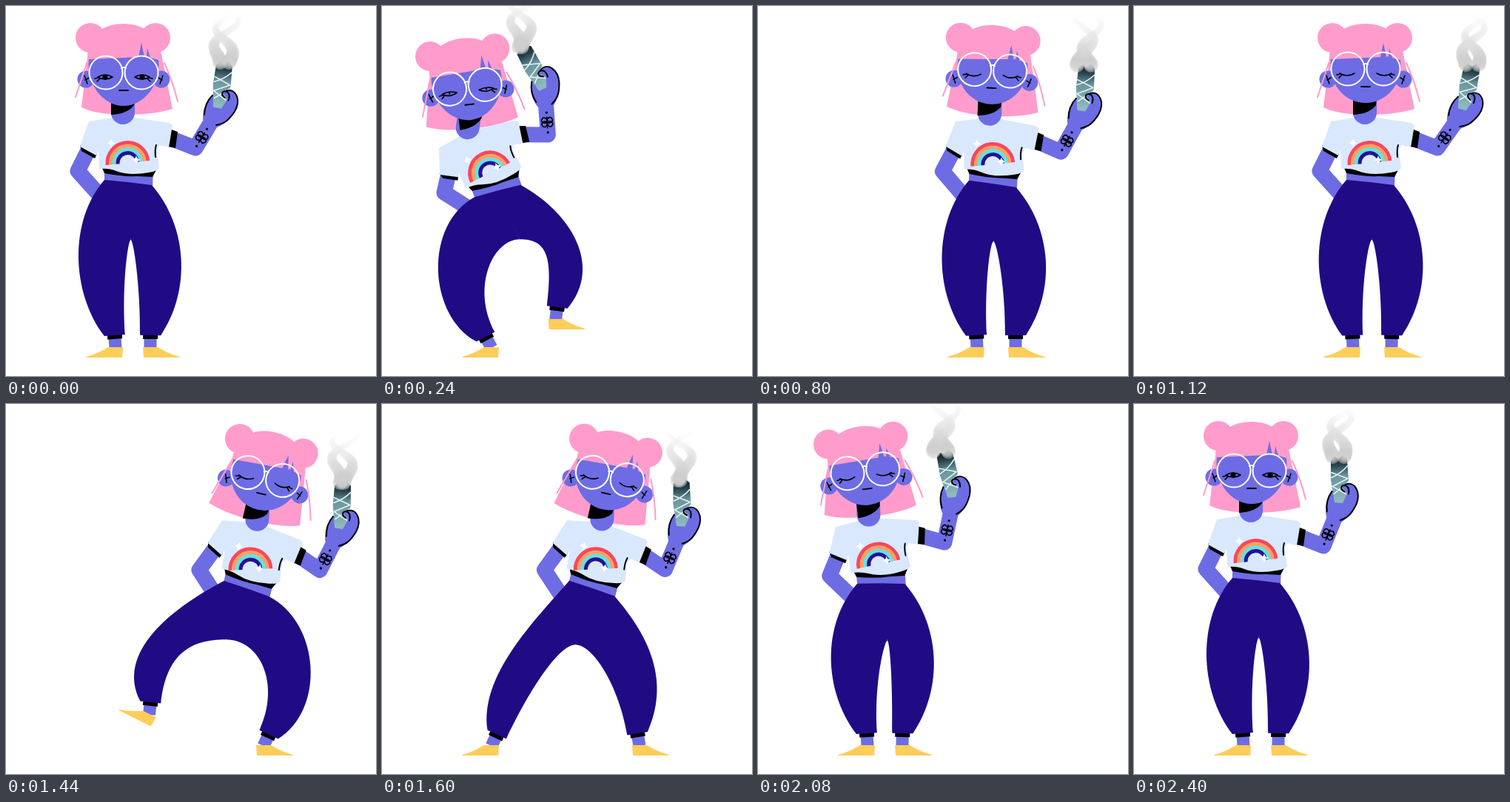
An HTML page with a canvas for the animation above (2.48 s loop, 500 by 500 pixels).

```html
<!DOCTYPE html>
<html lang="en">
<head>
<meta charset="utf-8">
<title>Dancer</title>
<style>
  html, body { margin: 0; width: 100%; height: 100%; overflow: hidden; background: #fff; }
  canvas { display: block; width: 500px; height: 500px; }
</style>
</head>
<body>
<canvas id="stage" width="500" height="500"></canvas>
<script>
const LOOP = 2480, STEP = 80, GROUND = 462;
const SKIN = '#6d6ce4', HAIR = '#ff9ccb', SHIRT = '#d9e8fd', PANTS = '#210b85', SHOE = '#ffcd58', INK = '#000';
const ctx = document.getElementById('stage').getContext('2d');

// Key poses: time, neck x, torso tilt, head tilt, forearm angle
const POSES = [
  [0, 159, 0, 0, 31],
  [240, 122, -21, -7, -4],
  [560, 228, -17, -16, 18],
  [840, 317, 3, 4, 30],
  [1120, 313, 0, 0, 35],
  [1440, 337, 13, 13, 27],
  [1680, 262, 12, 12, 20],
  [1840, 184, 5, 1, 13],
  [2080, 152, -6, -7, 12],
  [2400, 159, 0, 0, 22]
];

// Looping monotone cubic interpolation of every column
function sample(rows, t) {
  const n = rows.length;
  const at = (j, c) => rows[(j + n) % n][c] + (c ? 0 : Math.floor(j / n) * LOOP);
  const slope = (j, c) => (at(j + 1, c) - at(j, c)) / (at(j + 1, 0) - at(j, 0));
  const tangent = (j, c) => {
    const a = slope(j - 1, c), b = slope(j, c);
    return a * b > 0 ? 2 * a * b / (a + b) : 0;
  };
  let i = n - 1;
  while (rows[i][0] > t) i--;
  const span = at(i + 1, 0) - at(i, 0), u = (t - at(i, 0)) / span, v = 1 - u;
  return rows[i].slice(1).map((p, k) => {
    const c = k + 1;
    return p * v * v * (1 + 2 * u) + at(i + 1, c) * u * u * (3 - 2 * u) +
      span * u * v * (v * tangent(i, c) - u * tangent(i + 1, c));
  });
}

const progress = (t, from, to) => Math.min(1, Math.max(0, (t - from) / (to - from)));
const ease = (t, from, to) => { const u = progress(t, from, to); return u * u * (3 - 2 * u); };
const arch = (t, from, to) => Math.sin(Math.PI * progress(t, from, to));
const rad = deg => deg * Math.PI / 180;

function place(origin, deg, x, y) {
  const c = Math.cos(rad(deg)), s = Math.sin(rad(deg));
  return [origin[0] + x * c - y * s, origin[1] + x * s + y * c];
}
function group([x, y], deg, draw) {
  ctx.save();
  ctx.translate(x, y);
  ctx.rotate(rad(deg));
  draw();
  ctx.restore();
}
function fill(color, path) {
  ctx.fillStyle = color;
  ctx.fill(new Path2D(path));
}
function line(color, width, path, cap = 'round') {
  ctx.strokeStyle = color;
  ctx.lineWidth = width;
  ctx.lineCap = cap;
  ctx.lineJoin = 'round';
  ctx.stroke(new Path2D(path));
}
function disc(color, x, y, r) {
  ctx.fillStyle = color;
  ctx.beginPath();
  ctx.arc(x, y, r, 0, 7);
  ctx.fill();
}

// Each foot steps once through the air and slides back along the ground once.
function drawLegs(t, neck, tilt) {
  const liftR = arch(t, 120, 480), liftL = arch(t, 1200, 1580), crouch = liftL + liftR;
  const left = [148 + 148 * (ease(t, 460, 800) - ease(t, 1200, 1580)), GROUND - 46 * liftL];
  const right = [195 + 153 * (ease(t, 120, 480) - ease(t, 1680, 2020)), GROUND - 44 * liftR];
  const stride = right[0] - left[0];
  const crotch = place(neck, tilt, 8, 157 - 8 * crouch);
  crotch[0] += .35 * ((left[0] + right[0]) / 2 - crotch[0]);

  const halves = [[-1, left, -26, 76], [1, right, 38, 83]].map(([side, foot, x, y]) => {
    const waist = place(neck, tilt, x, y);
    const lean = Math.atan2(waist[0] - foot[0], foot[1] - waist[1]) * 180 / Math.PI;
    const hem = lean + side * 25 * crouch;
    const local = (px, py) => place(foot, hem, side * px, py);
    drawFoot(foot, hem, side < 0 ? 29 * liftL : 0, side);
    const hip = [waist[0] + side * (48 + 24 * crouch), waist[1] + 55 - 20 * crouch];
    const inside = [crotch[0] + side * (4 + 32 * crouch + .13 * (stride - 50)), crotch[1]];
    return `M${waist}C${hip} ${local(55, -79)} ${local(14, -17)}L${local(-14, -17)}` +
      `C${local(-14, -85)} ${inside} ${crotch}`;
  });
  halves.forEach(path => fill(PANTS, path + `L${place(neck, tilt, 6, 79)}Z`));
  line(PANTS, 2, `M${crotch[0]},${crotch[1] - 2}L${place(neck, tilt, 6, 81)}`, 'butt');
}

function drawFoot(foot, hem, angle, side) {
  const top = place(foot, hem, 0, -20), band = place(foot, hem, 0, -12);
  line(SKIN, 17, `M${top}L${foot}`, 'butt');
  line(INK, 20, `M${top}L${band}`, 'butt');
  group(foot, angle, () => {
    ctx.scale(side, 1);
    fill(SHOE, 'M-10,-1H10Q24,8 40,12L39,13H-9Z');
  });
}

function drawShirt(tilt) {
  fill(INK, 'M62,7L73,11L70,33L60,31Z');
  fill(INK, 'M-29,60L-26,67Q0,72 18,71L39,72L46,59Z');
  fill(INK, 'M-59,29L-36,41L-39,47L-57,37Z');
  fill(SHIRT, 'M-16,-8L-47,-3L-59,31L-37,43L-34,36L-33,61Q-20,60 -10,64Q8,71 34,66Q46,64 48,60L45,37L48,29L61,32L66,2L62,-1L16,-8Z');
  line(INK, 2, 'M44,29Q42,34 43,45');
  group([5.5, 53], Math.min(0, -.75 * tilt) - 6, () => {
    ['#f8475d', '#ffa060', '#5fe3ec', '#2a0f91'].forEach((color, i) => {
      const r = 27.5 - i * 4.7;
      line(color, 5, `M${-r},0A${r},${r} 0 0 1 ${r},0`, 'butt');
    });
  });
  for (const star of [[-17, 26], [17, 49]])
    group(star, 0, () => fill('#fff', 'M0,-6Q1,-1 6,0Q1,1 0,6Q-1,1 -6,0Q-1,-1 0,-6Z'));
}

function drawHair(tilt) {
  const sway = .7 * Math.abs(tilt);
  fill(HAIR, `M${-57 - sway},52L-49,-15C-48,-48 -27,-61 0,-61C27,-61 46,-46 51,-20L${66 - sway * .6},54Q40,62 0,62Q-40,61 ${-57 - sway},52Z`);
  disc(HAIR, -45, -42, 20);
  disc(HAIR, 43, -42, 20);
}

function drawFace(open) {
  const awake = Math.min(1, open * 3), chin = 46 + 4 * awake;
  fill(INK, 'M-17,40H15L14,49Q5,61 -17,62Z');
  for (const side of [-1, 1]) {
    disc(SKIN, side * 51, 14, 11.5);
    line(INK, 1.5, `M${side * 53},9L${side * 49},20M${side * 47},12L${side * 52},15`);
  }
  fill(SKIN, `M-47,-13L20,-16L24,-35L28,-16L31,-17L32,-28L36,-15L47,-12C51,20 28,${chin} 0,${chin}C-28,${chin} -51,20 -47,-13Z`);
  line(HAIR, 2, 'M-50,-8Q-57,14 -65,38M55,-8Q66,16 73,44');
  group([0, 5 * awake], 0, () => {
    for (const side of [-1, 1]) {
      group([side * 24, 5], 0, () => {
        ctx.scale(side, 1);
        line(INK, 1.6, `M-9,1Q1,7 11,1Q1,${7 - 9 * awake - 3 * open} -9,1M10,2L15,3M8,3L12,7`);
        disc(INK, 1, 1, 3.6 * open);
      });
      line('#fff', 2, `M${side * 24 - 22.5},0a22.5,22.5 0 1 1 45,0a22.5,22.5 0 1 1 -45,0`);
    }
    line('#fff', 2, 'M-3,-6Q0,-8 3,-6');
    line(INK, 1.8, 'M-6,24H6');
  });
}

function drawStick() {
  const shade = ctx.createLinearGradient(0, -60, 0, 0);
  shade.addColorStop(0, '#0a1a20');
  shade.addColorStop(.2, '#274048');
  shade.addColorStop(.45, '#6a959d');
  shade.addColorStop(1, '#8db9bf');
  fill(shade, 'M-8,3L-12,-28L-11,-54L-6,-59L0,-56L5,-61L11,-55L12,-28L8,-6L3,4Z');
  line('#e3f2f5', 1.6, 'M-11,-38L11,-29L-10,-19L8,-8M11,-46Q2,-36 -11,-31M11,-24L-8,-9');
}

function drawHand() {
  fill(SKIN, 'M-11,29C-22,12 -20,-6 -13,-12L-2,-22C8,-30 21,-18 20,-2C19,14 16,20 9,30Z');
  group([-2, 1], -24, drawStick);
  fill(SKIN, 'M-7,-16Q-3,-25 6,-19L12,-4L5,-5L2,-13Z');
  line(INK, 2, 'M-4,-21C6,-31 20,-20 20,-2C19,13 16,19 8,26M-17,-6C-20,6 -17,15 -13,22');
  line(INK, 2, 'M-1,-12C-10,-12 -9,-21 -1,-20Q4,-18 5,-11');
}

function drawTattoo() {
  for (const angle of [35, 145, 215, 325])
    group([0, 0], angle, () => line(INK, 1.6, 'M0,0C2,-5 9,-4 8,0C9,4 2,5 0,0'));
  line(INK, 1.6, 'M0,-7V8');
  disc(INK, 0, -13, 1.6);
  disc(INK, 0, 14, 1.6);
}

// Two strands of puffs that cross as they rise
function drawSmoke([x, y], t) {
  const turn = t / LOOP * 4 * Math.PI;
  for (let k = 30; k >= 0; k--) {
    const u = k / 30, tone = 205 + 43 * u;
    for (const side of [-1, 1]) {
      const sway = side * (5 + 14 * u) * Math.sin(u * 6 - turn + side * .5) - 5 * (1 - u);
      disc(`rgba(${tone},${tone},${tone},${.5 - .2 * u})`, x + sway + side * 6 * (1 - u), y + 2 - u * 62, 10 - 7 * u);
    }
  }
}

function draw(t) {
  const [x, tilt, headTilt, reach] = sample(POSES, t);
  const neck = [x, 159 + .9 * Math.abs(tilt)], head = place(neck, headTilt * .8, 0, -74);
  const shoulder = place(neck, tilt, 64, 20), elbow = place(neck, tilt, 97, 33);
  const alongArm = d => place(elbow, reach, 0, -d);
  const hand = alongArm(67);
  const open = 1 - ease(t, 0, 400) + ease(t, 2080, 2320);

  ctx.clearRect(0, 0, 500, 500);
  group(neck, tilt, () => {
    line(SKIN, 21, `M-46,32L-62,${64 + tilt * .4}L-27,103`);
    fill(SKIN, 'M-26,58H40L39,88L-26,82Z');
  });
  drawLegs(t, neck, tilt);
  group(head, headTilt, () => drawHair(headTilt));
  line(SKIN, 21, `M${shoulder}L${elbow}L${alongArm(47)}`, 'butt');
  group(neck, tilt, () => drawShirt(tilt));
  line(SKIN, 32, `M${place(head, headTilt, -1, 40)}L${place(neck, tilt, -1, -15)}`);
  group(head, headTilt, () => drawFace(open));
  group(alongArm(17), reach, drawTattoo);
  group(hand, reach, drawHand);
  drawSmoke(place(hand, reach - 24, 0, -61), t);
}

function tick() {
  draw(Math.floor(performance.now() % LOOP / STEP) * STEP);
  requestAnimationFrame(tick);
}
tick();
</script>
</body>
</html>
```
